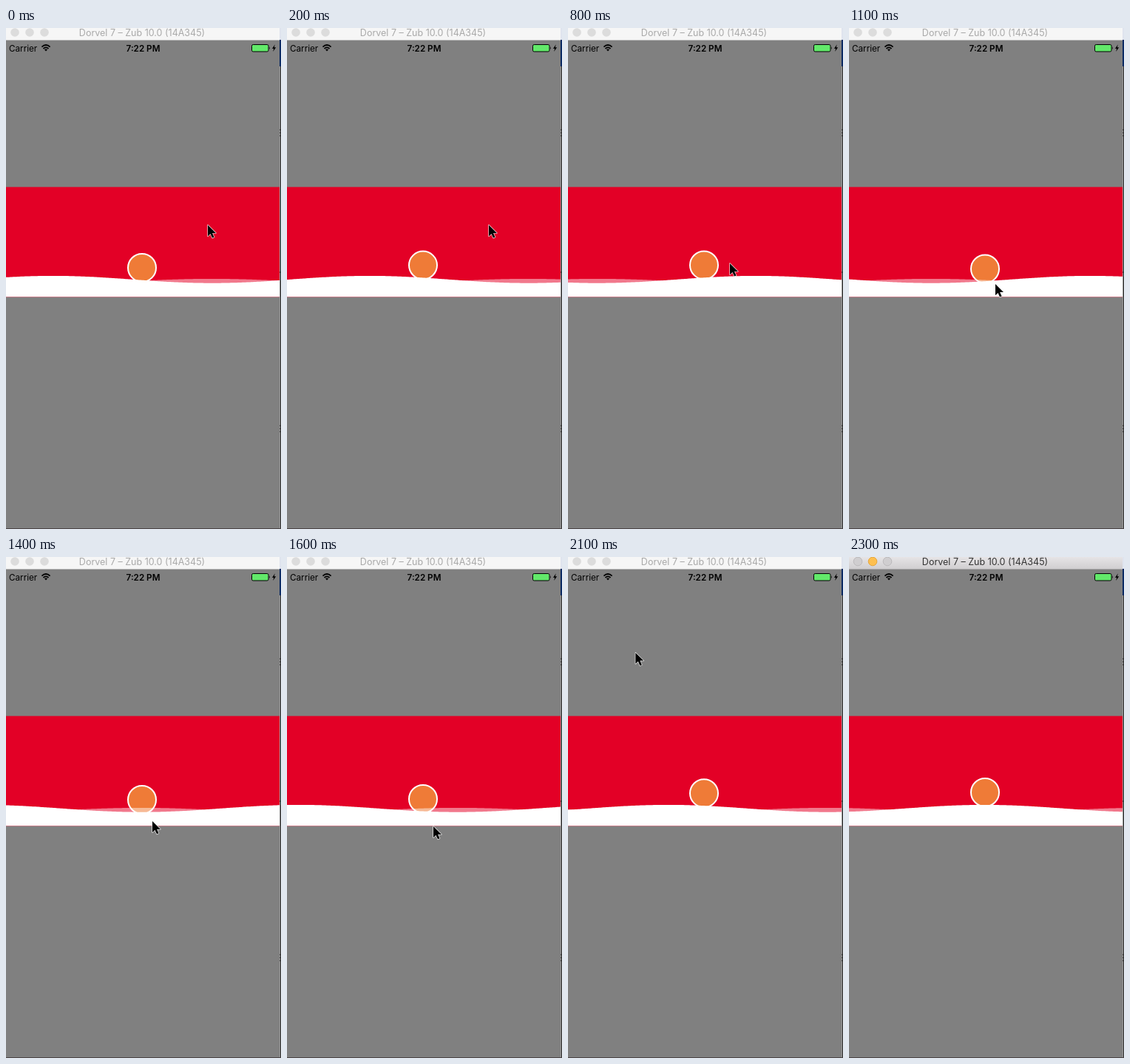
These frames come from a looping animation (372x679 px, 2400 ms). An HTML page:

```html
<!DOCTYPE html>
<html lang="en">
<head>
<meta charset="utf-8">
<title>Wave header</title>
<style>
  html, body { margin: 0; width: 100%; height: 100%; overflow: hidden; background: #808080; }
  svg { display: block; width: 372px; height: 679px; }
  text { font-family: Inter, "Liberation Sans", sans-serif; font-size: 11.7px; }
  #title { font-size: 12.5px; fill: #a9a9a9; text-anchor: middle; }
  .bar { fill: #f6f6f6; }
  .dot { fill: #dcdcdc; }
  .active .bar { fill: url(#metal); }
  .active #title { fill: #333; }
  .active .dot { fill: #d0ced0; stroke: #bcbabc; }
  .active .min { fill: #fdbf4f; stroke: #e5a63c; }
</style>
</head>
<body>
<svg viewBox="0 0 372 679">
  <defs>
    <linearGradient id="metal" x2="0" y2="1">
      <stop stop-color="#e6e4e6"/>
      <stop offset="1" stop-color="#d0ced0"/>
    </linearGradient>
  </defs>

  <rect width="372" height="679" fill="#808080"/>

  <g id="window">
    <rect class="bar" width="370" height="16.5"/>
    <circle class="dot" cx="12" cy="6" r="5.8"/>
    <circle class="dot min" cx="32" cy="6" r="5.8"/>
    <circle class="dot" cx="52" cy="6" r="5.8"/>
    <text id="title" x="184" y="11">Dorvel 7 – Zub 10.0 (14A345)</text>
  </g>

  <!-- status bar -->
  <text x="4" y="31.5">Carrier</text>
  <text x="185.5" y="31.5" text-anchor="middle" font-weight="600">7:22 PM</text>
  <g fill="none" stroke="#000" stroke-width="1.7">
    <path d="M48.4 25.6Q54 20.4 59.6 25.6M50.5 28Q54 24.8 57.5 28"/>
    <path d="M52 29.3Q54 27.7 56 29.3L54 31.6Z" fill="#000" stroke="none"/>
  </g>
  <rect x="332.5" y="22.5" width="22.5" height="9.5" rx="1.8" fill="#62e96a" stroke="#000"/>
  <path d="M356 25.3q1.6 1.9 0 3.8z"/>
  <path d="M363.8 22.3L360 27.9h2.2l-1 4.2 4-5.8h-2.4z"/>

  <!-- header -->
  <rect y="215.5" width="370" height="149" fill="#e30026"/>
  <circle id="ball" cx="184" r="19" fill="#ef7b37" stroke="#fff" stroke-width="2"/>
  <path id="back" fill="#fff" fill-opacity=".47"/>
  <path id="front" fill="#fff"/>

  <!-- desktop edge -->
  <rect x="370" width="1" height="679" fill="#979797"/>
  <rect x="371" width="1" height="679" fill="#2a2a2a"/>
  <rect x="370" width="2" height="16" fill="#dfe4ee"/>
  <rect x="370" y="16" width="2" height="36" fill="#0b2a63"/>
  <path d="M370 138h2M370 142h1M370 146h2M370 331h1M370 539h1M370 543h1M370 547h1" stroke="#222"/>
  <rect y="678" width="372" height="1" fill="#4a4345"/>

  <path id="cursor" d="M0 0V15.2L3.5 11.9 6 17.6 8.6 16.5 6.1 10.9H11Z"
        stroke="#fff" stroke-width="1.2" stroke-linejoin="round" paint-order="stroke"/>
</svg>
<script>
  const LOOP = 2400, STEP = 100, ACTIVE_AT = 2300;
  const PERIOD = 1800, LENGTH = 430, CREST_AT = 500, CREST_X = 183;
  const WIDTH = 370, BOTTOM = 364.3, BALL_X = 184;
  const $ = id => document.getElementById(id);

  // pointer stops: time, x, y
  const stops = [
    [0, 273, 267], [600, 273, 267], [800, 219, 319], [950, 203, 339],
    [1100, 198, 347], [1400, 198, 358], [1600, 198, 365],
    [1900, 198, 365], [2200, 38, 12], [2300, 32, 6]
  ];

  function pointer(t) {
    const i = Math.max(1, stops.findIndex(s => s[0] >= t));
    const [t0, x0, y0] = stops[i - 1], [t1, x1, y1] = stops[i];
    const p = (t - t0) / (t1 - t0);
    return [x0 + (x1 - x0) * p, y0 + (y1 - y0) * p];
  }

  // 1 on the crest, -1 in the trough
  function swell(x, t) {
    const phase = (x - CREST_X) / LENGTH - (t - CREST_AT) / PERIOD;
    return Math.cos(2 * Math.PI * phase);
  }

  function wave(level, height, t) {
    let d = `M0 ${BOTTOM}`;
    for (let x = 0; x <= WIDTH; x += 2) d += `L${x} ${(level - height * swell(x, t)).toFixed(2)}`;
    return d + `V${BOTTOM}Z`;
  }

  function draw(t) {
    const active = t >= ACTIVE_AT;
    $("front").setAttribute("d", wave(340.8, 4.9, t));
    $("back").setAttribute("d", wave(343.2, -3.3, t));
    $("ball").setAttribute("cy", 324 - 5 * swell(BALL_X, t));
    $("window").classList.toggle("active", active);
    $("cursor").style.display = active ? "none" : "";
    $("cursor").setAttribute("transform", `translate(${pointer(Math.min(t, ACTIVE_AT))})`);
  }

  function tick() {
    const now = performance.now() % LOOP;
    draw(Math.floor(now / STEP) * STEP);
    requestAnimationFrame(tick);
  }
  tick();
</script>
</body>
</html>
```
